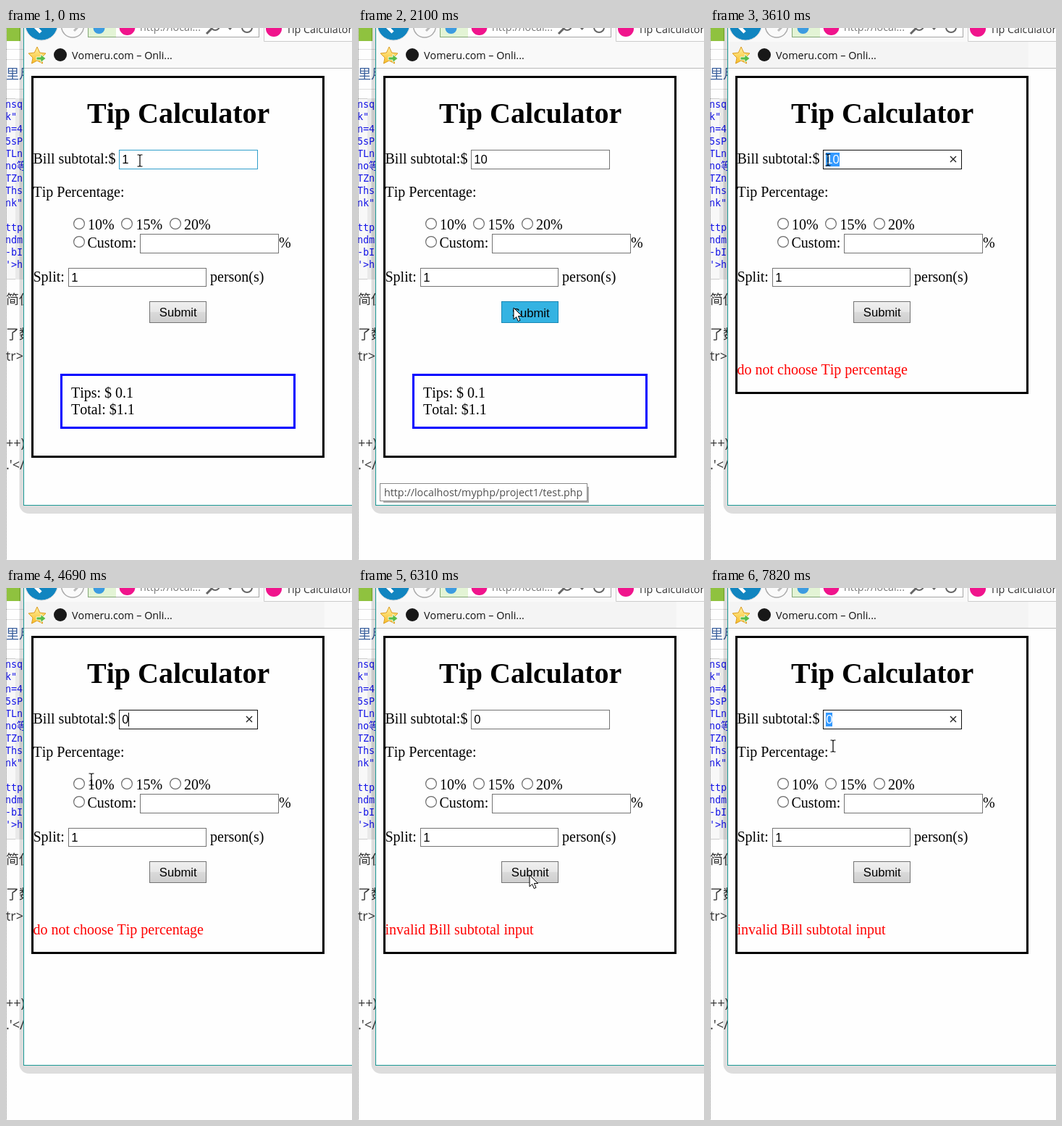
Recreate the animation shown at these times as an HTML page. Size 478x734 px, loop 8000 ms.

```html
<!DOCTYPE html>
<html lang="en">
<head>
<meta charset="utf-8">
<title>Tip Calculator</title>
<style>
html, body { margin: 0; width: 478px; height: 734px; overflow: hidden; background: #fefefe; }
svg { display: block; }
text { white-space: pre; }
.serif { font: 20px "Liberation Serif", Tinos, "Times New Roman", serif; }
.sans { font: 16.67px "Liberation Sans", Arial, sans-serif; }
.ui { font: 14.3px "Open Sans", "Noto Sans", sans-serif; }
.code { font: 13.4px "DejaVu Sans Mono", "Noto Sans Mono", "Noto Sans CJK SC", monospace; fill: #1414e6; }
.doc { font: 18px "Open Sans", "Noto Sans CJK SC", "Noto Sans", sans-serif; fill: #333; }
.serif, .sans, .ui { font-kerning: none; font-variant-ligatures: none; }
.field { fill: #fff; stroke: #747474; }
.radio { fill: #fff; stroke: #6a6a6a; stroke-width: 1.2; }
</style>
</head>
<body>
<svg width="478" height="734" viewBox="0 0 478 734">
  <defs>
    <linearGradient id="face" x2="0" y2="1">
      <stop offset="0" stop-color="#f0f0f0"/><stop offset=".48" stop-color="#e6e6e6"/>
      <stop offset=".5" stop-color="#dadada"/><stop offset="1" stop-color="#cecece"/>
    </linearGradient>
    <linearGradient id="star" x2="0" y2="1">
      <stop offset="0" stop-color="#fff0a0"/><stop offset="1" stop-color="#f7bd25"/>
    </linearGradient>
  </defs>

  <!-- page behind the window -->
  <rect width="478" height="734" fill="#fefefe"/>
  <rect x="1" y="0" width="19" height="18" fill="#8fc23f"/>
  <path d="M0 29.5H25M0 43.5H25M0 84.5H25" stroke="#ddd"/>
  <rect y="97" width="25" height="250" fill="#f8f8f8"/>
  <path d="M0 97.5H25M0 346.5H25" stroke="#ccc"/>
  <rect x="13" y="97" width="12" height="250" fill="#e9e9e9"/>
  <g id="strip"></g>
  <path d="M.5 0V734" stroke="#888" stroke-dasharray="1 1"/>

  <!-- window -->
  <rect x="18.5" y="-20" width="490" height="690" rx="13" fill="#000" opacity=".13"/>
  <rect x="24.5" y="-5" width="480" height="663.5" fill="#fefefe" stroke="#1b9995"/>
  <rect x="25" y="0" width="453" height="55" fill="#f9f9f9"/>
  <rect id="bar" x="25" y="19" width="415" height="36" fill="#f4f4f4"/>
  <path d="M25 55.5H478" stroke="#b9b9b9"/>

  <!-- toolbar -->
  <circle cx="92" cy="-2.5" r="15.5" fill="#fafafa" stroke="#aaa" stroke-width="1.4"/>
  <path d="M84 -2H100L94 4M100 -2" fill="none" stroke="#bbb" stroke-width="3"/>
  <circle cx="49" cy="-5.5" r="22.5" fill="#1185c0" stroke="#cfd6da"/>
  <path d="M39 -3H61M48 -12L39 -3L48 6" fill="none" stroke="#fff" stroke-width="4.5"/>
  <rect x="113.5" y="-5" width="236" height="17.5" fill="#fff" stroke="#a6a6a6"/>
  <rect x="114" y="-5" width="38" height="17" fill="#e3f4d5"/>
  <path d="M113.5 0V12.5H152" fill="none" stroke="#85a878"/>
  <circle cx="128.5" cy="0" r="8" fill="#3c9be0"/>
  <circle cx="167.5" cy="-1" r="11" fill="#f0148c"/>
  <text class="ui" x="185" y="4" fill="#777">http://local...</text>
  <path d="M277 8L285 0" stroke="#666" stroke-width="3"/>
  <circle cx="289" cy="-3" r="6" fill="none" stroke="#666" stroke-width="2"/>
  <path d="M306 -1H313L309.5 3Z" fill="#666"/>
  <circle cx="333" cy="-1" r="7" fill="none" stroke="#666" stroke-width="2"/>
  <path d="M357 0H478V18H357Z" fill="#fdfdfd"/>
  <path d="M356.5 0V18.5H478" fill="none" stroke="#ccc"/>
  <circle cx="370" cy="1" r="11" fill="#f0148c"/>
  <text class="ui" x="387" y="7" fill="#333">Tip Calculator</text>
  <path d="M43 26L46.7 34L55 35L49 41L50.5 49L43 45L35.5 49L37 41L31 35L39.3 34Z" fill="url(#star)" stroke="#dc9d23" stroke-linejoin="round"/>
  <path d="M42 40H48V36.5L55 42L48 47.5V44H42Z" fill="#58bd48" stroke="#fff" stroke-width=".8"/>
  <circle cx="75" cy="37" r="9" fill="#181818"/>
  <text class="ui" x="91" y="43" fill="#111">Vomeru.com – Onli...</text>

  <!-- form -->
  <rect id="frame" x="36.5" y="67.5" width="402" height="524" fill="none" stroke="#000" stroke-width="3"/>
  <text class="serif" x="112" y="131" style="font-size:40px;font-weight:bold">Tip Calculator</text>
  <g class="serif" id="labels"></g>
  <rect class="field" id="bill" x="156.5" y="168.5" width="191" height="26"/>
  <rect class="field" x="185.5" y="284.5" width="191" height="26"/>
  <rect class="field" x="86.5" y="331.5" width="190" height="25"/>
  <g id="radios"></g>
  <circle id="dot" cx="101" cy="270" r="4.4" fill="#222"/>
  <rect id="sel" x="160" y="172" height="19" fill="#3399ff"/>
  <text class="sans" id="value" x="160.3" y="187"></text>
  <path id="caret" d="M0 172V191" stroke="#000"/>
  <path id="clear" d="M332 177L340 185M340 177L332 185" stroke="#222" stroke-width="1.4"/>
  <text class="sans" x="90.3" y="350">1</text>
  <rect id="btn" x="198.5" y="377.5" width="78" height="29"/>
  <text class="sans" id="submit" x="211.8" y="398">Submit</text>

  <g id="result" class="serif">
    <rect x="76.5" y="478.5" width="322" height="73" fill="none" stroke="#00f" stroke-width="3"/>
    <text x="90" y="510">Tips: $ 0.1</text>
    <text x="90" y="533">Total: $1.1</text>
  </g>
  <text class="serif" id="error" x="37.5" y="478" fill="#f00"></text>

  <g id="tip">
    <rect x="35" y="633" width="284" height="22" fill="#999" opacity=".8"/>
    <rect x="30.5" y="628.5" width="286" height="24" fill="#fff" stroke="#8a8a8a"/>
    <text class="ui" id="url" x="36" y="646" fill="#505050">http://localhost/myphp/project1/test.php</text>
  </g>

  <path id="beam" d="M-3.5 -8H-1L0 -7L1 -8H3.5M0 -7V7M-3.5 8H-1L0 7L1 8H3.5" fill="none" stroke="#000" stroke-width="1.2"/>
  <path id="arrow" d="M0 0V16L3.7 12.6L6.3 18.6L9 17.4L6.4 11.5H11.5Z" fill="#fff" stroke="#000"/>
</svg>
<script>
const $ = id => document.getElementById(id);
const set = (id, attrs) => { for (const k in attrs) $(id).setAttribute(k, attrs[k]); };
const show = (id, on) => set(id, { visibility: on ? 'visible' : 'hidden' });
const textAt = (cls, x, y, s) => `<text class="${cls}" x="${x}" y="${y}">${s}</text>`;

$('labels').innerHTML = [
  [37.5, 187, 'Bill subtotal:$'], [37.5, 233, 'Tip Percentage:'],
  [113, 278, '10%'], [179.5, 278, '15%'], [246, 278, '20%'],
  [112.5, 303, 'Custom:'], [377, 303, '%'],
  [37.5, 350, 'Split:'], [282, 350, 'person(s)']
].map(([x, y, s]) => textAt('', x, y, s)).join('');

$('radios').innerHTML = [[101, 270], [167, 270], [234, 270], [101, 295]]
  .map(([x, y]) => `<circle class="radio" cx="${x}" cy="${y}" r="7.4"/>`).join('');

const code = ['nsq', 'k"', 'n=4', '5sP', 'TLn', 'no等', 'TZn', 'Ths', 'nk"', '', 'ttp', 'ndm', '-bI', "'&gt;h"];
const doc = [[70, '里月'], [381, '简使'], [429, '了数'], [459, 'tr&gt;'], [579, '++)'], [609, ".'&lt;/"]];
$('strip').innerHTML =
  code.map((s, i) => textAt('code', -1, 110 + i * 17, s)).join('') +
  doc.map(([y, s]) => textAt('doc', 0, y, s)).join('');
$('strip').querySelector('.doc').style.fill = '#3a5f9c';

// Each step changes only the listed properties, held until the next step.
const steps = [
  [0, { cur: 'beam', x: 185, y: 183, value: '1', field: 'hover', caret: 0, sel: 0, btn: 'idle', tip: 0, checked: 0, error: '' }],
  [120, { field: 'focus', caret: 1 }],
  [550, { caret: 0 }],
  [700, { caret: 1 }],
  [1110, { value: '10' }],
  [1250, { x: 187, y: 190 }],
  [1390, { cur: 'arrow', x: 192, y: 231 }],
  [1530, { x: 202, y: 302 }],
  [1670, { x: 211, y: 361 }],
  [1810, { x: 215, y: 384, btn: 'hover', tip: .5 }],
  [1950, { y: 386, tip: 1 }],
  [2100, { field: 'idle', caret: 0, btn: 'down' }],
  [2230, { btn: 'hover' }],
  [2370, { error: 'do not choose Tip percentage', btn: 'idle' }],
  [2500, { y: 372 }],
  [2640, { x: 212, y: 300, tip: .8 }],
  [2780, { x: 207, y: 215, tip: .5 }],
  [2910, { cur: 'beam', x: 193, y: 188, field: 'hover', tip: 0 }],
  [3050, { x: 185, y: 183 }],
  [3460, { field: 'focus', caret: 1 }],
  [3600, { x: 163, y: 182, caret: 0, sel: 1 }],
  [3730, { x: 141 }],
  [4260, { value: '0', sel: 0, caret: 1 }],
  [4400, { x: 138, y: 196 }],
  [4540, { x: 128, y: 232 }],
  [4690, { x: 118, y: 264 }],
  [4820, { cur: 'arrow', x: 107, y: 269 }],
  [4950, { x: 101, y: 270 }],
  [5080, { field: 'idle', caret: 0 }],
  [5200, { checked: 1 }],
  [5350, { x: 187, y: 348 }],
  [5470, { x: 237, y: 398, btn: 'hover', tip: .75 }],
  [5610, { y: 396, tip: 1 }],
  [5750, { btn: 'down' }],
  [5890, { btn: 'hover' }],
  [6030, { btn: 'idle', checked: 0, error: 'invalid Bill subtotal input' }],
  [6170, { tip: .5 }],
  [6310, { tip: 0 }],
  [6590, { x: 234, y: 387, btn: 'hover', tip: .5 }],
  [6720, { x: 218, y: 310, btn: 'idle', tip: .75 }],
  [6850, { x: 198, y: 222, tip: .4 }],
  [6990, { cur: 'beam', x: 184, y: 183, field: 'hover', tip: 0 }],
  [7120, { x: 180, field: 'focus', caret: 1 }],
  [7260, { x: 156, y: 187, caret: 0, sel: 1 }],
  [7390, { x: 141, y: 232 }],
  [7520, { x: 134, y: 283 }],
  [7670, { x: 150, y: 251 }],
  [7820, { x: 170, y: 218 }]
];

const borders = { idle: '#747474', hover: '#319fcb', focus: '#111' };
const faces = {
  idle: ['url(#face)', '#747474'],
  hover: ['#a7f3ff', '#2aa0d4'],
  down: ['#34b3e2', '#1787b4']
};

function draw(t) {
  const s = {};
  for (const [at, change] of steps) if (at <= t) Object.assign(s, change);
  const width = s.value.length * 9.27, fresh = !s.error, down = s.btn === 'down';

  set('bill', { style: `stroke:${borders[s.field]}` });
  show('clear', s.field === 'focus');
  $('value').textContent = s.value;
  set('value', { fill: s.sel ? '#fff' : '#000' });
  set('sel', { width: Math.round(width) });
  show('sel', s.sel);
  set('caret', { transform: `translate(${Math.round(160 + width) + .5})` });
  show('caret', s.caret);
  show('dot', s.checked);

  set('btn', { fill: faces[s.btn][0], stroke: faces[s.btn][1] });
  set('submit', { transform: down ? 'translate(1 1)' : '' });

  set('frame', { height: fresh ? 524 : 436 });
  show('result', fresh);
  show('bar', !fresh);
  $('error').textContent = s.error;
  show('tip', s.tip);
  set('url', { opacity: s.tip });

  for (const id of ['beam', 'arrow']) {
    show(id, s.cur === id);
    set(id, { transform: `translate(${s.x} ${s.y})` });
  }
}

const start = performance.now();
function loop() {
  draw((performance.now() - start) % 8000);
  requestAnimationFrame(loop);
}
loop();
</script>
</body>
</html>
```
